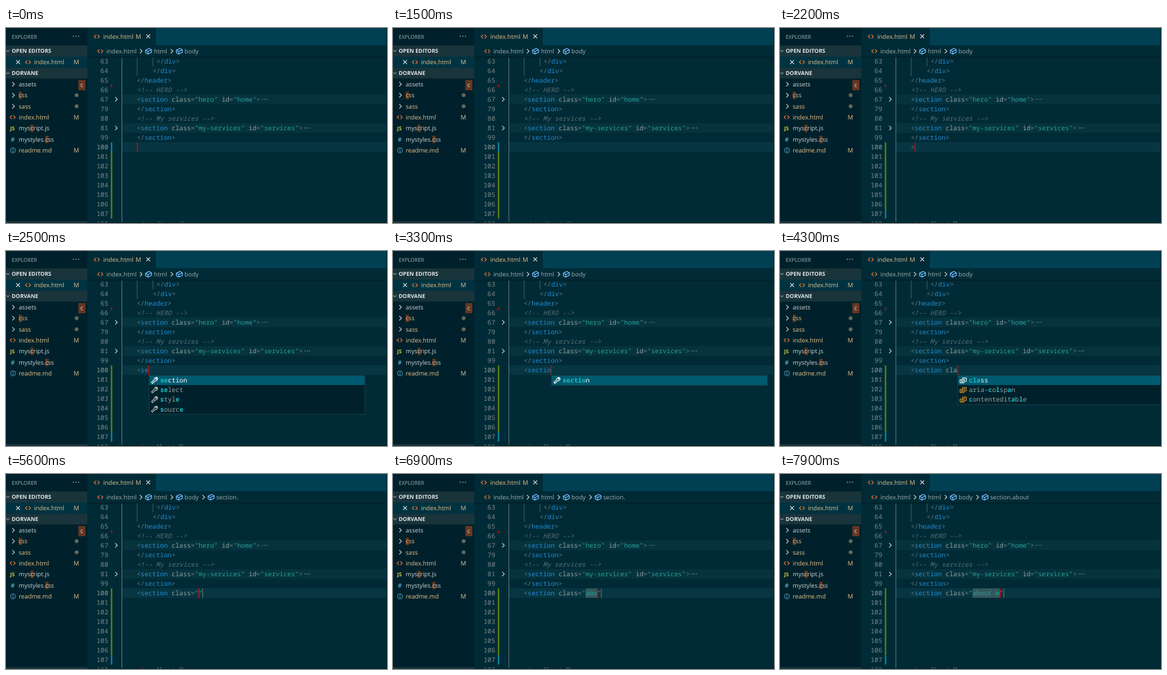
An HTML page for the animation above (8 s loop, 600 px wide and 307 px high).

```html
<!DOCTYPE html>
<html lang="en">
<head>
<meta charset="utf-8">
<style>
  html, body { margin: 0; width: 100%; height: 100%; overflow: hidden; background: #002b36; }
  svg { display: block; width: 600px; height: 307px; }
  text { font: 9.65px "Open Sans", "Noto Sans", sans-serif; white-space: pre; text-rendering: geometricPrecision; }
  .code { font: 10.13px "Noto Sans Mono", "DejaVu Sans Mono", monospace; }
  .comment { fill: #586e75; font-style: italic; }
  .tag { fill: #268bd2; }
  .attr { fill: #93a1a1; }
  .string { fill: #2aa198; }
  .punct { fill: #657b83; }
  .bad { fill: #dc322f; }
  .hit { fill: #1ebcc5; font-weight: bold; }
  .head { font-size: 8.6px; font-weight: bold; }
</style>
</head>
<body>
<svg id="stage" viewBox="0 0 600 307">
  <g id="fixed"></g>
  <g id="live"></g>
</svg>
<script>
const LOOP = 8000, CHAR = 6.08, LEFT = 206, ROW = 15.06;
const rowMid = i => 52 + i * ROW;
const MOD = '#e2c08d', PALE = '#ccd2d3', HEADER = '#1a343c', EDGE = '#001e26';

const esc = s => s.replace(/&/g, '&amp;').replace(/</g, '&lt;').replace(/>/g, '&gt;');
const span = (cls, s) => `<tspan class="${cls}">${esc(s)}</tspan>`;
const rect = (x, y, w, h, fill, extra = '') =>
  `<rect x="${x}" y="${y}" width="${w}" height="${h}" fill="${fill}" ${extra}/>`;
const line = (d, color, w = 1) => `<path d="${d}" fill="none" stroke="${color}" stroke-width="${w}"/>`;
const label = (x, y, s, color = PALE, extra = '') =>
  `<text x="${x}" y="${y + 3.4}" fill="${color}" ${extra}>${s}</text>`;
const code = (x, y, html, color = '#93a1a1', extra = '') =>
  `<text class="code" x="${x}" y="${y + 3.5}" fill="${color}" ${extra}>${html}</text>`;

// Icons, centred on x, y
const chevron = (x, y) => line(`M${x - 1.6} ${y - 3.4}l3.4 3.4l-3.4 3.4`, '#d0d4d4', 1.1);
const chevronDown = (x, y) => line(`M${x - 2.5} ${y - 1.2}l2.5 2.5l2.5 -2.5`, '#c5c5c5');
const cross = (x, y) => line(`M${x - 3} ${y - 3}l6 6m0 -6l-6 6`, '#e4e8e8', 1.1);
const angles = (x, y) =>
  line(`M${x - 1.2} ${y - 2.8}l-2.8 2.8l2.8 2.8M${x + 1.2} ${y - 2.8}l2.8 2.8l-2.8 2.8`, '#e37933', 1.2);
const cube = (x, y) =>
  line(`M${x - 4.7} ${y - 1.6}L${x + 1} ${y - 4.4}L${x + 4.7} ${y - 2.2}V${y + 1.8}L${x - 1} ${y + 4.6}L${x - 4.7} ${y + 2.4}Z` +
    `M${x - 4.7} ${y - 1.6}L${x - 1} ${y + .6}L${x + 4.7} ${y - 2.2}M${x - 1} ${y + .6}V${y + 4.6}`, '#75beff', 1.2);
const dots = (x, y, color, gap = 4) =>
  [-gap, 0, gap].map(d => `<circle cx="${x + d}" cy="${y}" r=".8" fill="${color}"/>`).join('');
const wrench = (x, y, color) =>
  line(`M${x - 4.6} ${y + 3.2}L${x - .2} ${y - 1.2}A3.1 3.1 0 0 1 ${x + 3.8} ${y - 4.6}L${x + 1.9} ${y - 2.6}` +
    `L${x + 2.6} ${y - 1.7}L${x + 4.8} ${y - 3.6}A3.1 3.1 0 0 1 ${x + 1.4} ${y + .6}L${x - 3} ${y + 4.8}Z`, color, 1.1);
const valueIcon = (x, y, color) =>
  line(`M${x - 1} ${y - 1.5}V${y - 4}H${x + 5}V${y + 1.5}H${x + 2}M${x - 5} ${y - 1}H${x + 1.5}V${y + 4}H${x - 5}Z` +
    `M${x - 3.5} ${y + .8}h3.5m-3.5 1.7h3.5M${x + 1} ${y - 2}h2.5`, color);

// Colours one line of markup
const TOKENS = /<!--.*|(?<=<\/?)\w+|"[^"]*"?|[\w-]+|[<\/>=]+| +/g;
function paint(src) {
  return src.replace(TOKENS, (tok, at) => {
    const cls = tok.startsWith('<!--') ? 'comment'
      : tok[0] === '"' ? 'string'
      : /[<\/>=]/.test(tok) ? 'punct'
      : /[<\/]/.test(src[at - 1] || '') ? 'tag' : 'attr';
    return span(cls, tok);
  });
}

function sidebar() {
  const hit = (x, y, w) => rect(x, y - 5.5, w, 11.5, '#653719');
  let s = rect(0, 0, 128, 307, '#00212b') + rect(0, 27.5, 128, 17.5, HEADER) +
    rect(0, 45, 128, 17.5, '#003341') + rect(0, 62.5, 128, 17, HEADER) + rect(0, 304, 128, 3, HEADER) +
    label(9, 13.5, 'EXPLORER', '#a5b0b3', 'style="font-size:8.3px"') + dots(110, 13, PALE) +
    chevronDown(3, 36) + label(9, 35.5, 'OPEN EDITORS', '#dfe4e4', 'class="head"') +
    cross(19, 53.7) + angles(34.5, 53.7) + label(44, 53.7, 'index.html', MOD) + label(106.5, 53.7, 'M', MOD) +
    chevronDown(3, 71) + label(9, 70.5, 'DORVANE', '#dfe4e4', 'class="head"');
  const tree = ['assets', 'css', 'sass', 'index.html', 'myscript.js', 'mystyles.css', 'readme.md'];
  const treeY = i => 88.5 + i * 17.35;
  s += hit(20, treeY(1), 5) + hit(38.5, treeY(4), 5) + hit(62, treeY(5), 5);
  tree.forEach((name, i) => {
    const y = treeY(i), changed = [1, 2, 3, 6].includes(i);
    s += label(20, y, name, changed ? MOD : PALE);
    if (i < 3) s += chevron(11.5, y);
    if (i === 1 || i === 2) s += `<circle cx="111.2" cy="${y}" r="3" fill="#62695a"/>`;
    if (i === 3 || i === 6) s += label(106.5, y, 'M', MOD);
  });
  return s + angles(10.5, treeY(3)) +
    label(6.5, treeY(4), 'JS', '#cbcb41', 'style="font-size:8.2px;font-weight:bold"') +
    label(7.5, treeY(5), '#', '#519aba', 'style="font-weight:bold"') +
    `<circle cx="11" cy="${treeY(6)}" r="4" fill="none" stroke="#519aba"/>` +
    line(`M11 ${treeY(6) - 2.5}v1.2m0 .8v3`, '#519aba', 1.2) +
    rect(114, 82, 11, 16, '#653723') + label(117, 90, 'c', '#e0dcd8');
}

function editor() {
  let s = rect(128, 0, 472, 27, '#004052') + rect(128, 0, 108, 27.5, '#002b37') +
    angles(143, 13.5) + label(153, 13.5, 'index.html', MOD) + label(204, 13.5, 'M', MOD) + cross(224, 13.2) +
    angles(148.5, 36.5) + label(158, 36.5, 'index.html', '#a0acad') +
    chevron(212.5, 36.5) + cube(224.5, 36.5) + label(233, 36.5, 'html', '#a0acad') +
    chevron(261, 36.5) + cube(273, 36.5) + label(281, 36.5, 'body', '#a0acad');
  [4, 7].forEach(i => { s += rect(183, rowMid(i) - 7.5, 417, 15, '#06333d'); });
  s += rect(183, rowMid(9) - 7.5, 417, 15, '#073642');
  s += line('M182.5 45V305', '#5f797e') + line('M206.5 45V75M231.5 45V60', '#476166', .9);
  s += rect(128, 45, 472, 1, EDGE) + rect(128, 46, 472, 1.5, EDGE, 'opacity=".4"');

  const rows = ['', '', '</header>', '<!-- HERO -->', '<section class="hero" id="home">', '</section>',
    '<!-- My services -->', '<section class="my-services" id="services">', '</section>'];
  s += code(237, rowMid(0), paint('</div>')) + code(231, rowMid(1), paint('</div>'));
  rows.forEach((src, i) => { s += code(LEFT, rowMid(i), paint(src)); });
  [4, 7].forEach(i => {
    s += chevron(173.5, rowMid(i)) + dots(LEFT + rows[i].length * CHAR + 7, rowMid(i), '#758a90', 3.5);
  });
  const numbers = [63, 64, 65, 66, 67, 79, 80, 81, 99];
  for (let n = 100; n <= 108; n++) numbers.push(n);
  numbers.forEach((n, i) => {
    s += code(161, rowMid(i), n, n === 100 ? '#8f9a9b' : '#7e888a', 'text-anchor="end"');
  });
  return s + '<path d="M165 88l3.5 3l-3.5 3z" fill="#94151b"/>';
}

// [time, typed text]; the caret blink restarts at each key
const KEYS = [
  [0, ''], [2100, '<'], [2300, '<s'], [2500, '<se'], [2800, '<sec'], [2950, '<sect'], [3100, '<secti'],
  [3300, '<sectio'], [3500, '<section'], [3700, '<section '], [3900, '<section c'], [4100, '<section cl'],
  [4300, '<section cla'], [4550, '<section clas'], [4800, '<section class']
];
const OPEN = '<section class="';
KEYS.push([5200, OPEN]);
[6500, 6650, 6800, 6950, 7080, 7200, 7500].forEach((t, i) => KEYS.push([t, OPEN + 'about-m'.slice(0, i + 1)]));

// Suggestions by typed word; capitals mark the matching letters
const MENUS = {
  s: ['Section', 'Select', 'Style', 'Source', 'Script', 'Small', 'Span'],
  se: ['SEction', 'SElect', 'StylE', 'SourcE'],
  c: ['Class', 'Contenteditable', 'Contextmenu', 'aria-Checked', 'aria-Colcount', 'aria-Colspan'],
  cl: ['CLass', 'aria-CoLspan', 'aria-CoLcount', 'aria-CoLindex', 'ContenteditabLe'],
  cla: ['CLAss', 'aria-CoLspAn', 'ContenteditAbLe'],
  clas: ['CLASs']
};
for (let n = 3; n <= 7; n++) {
  const word = 'section'.slice(0, n);
  MENUS[word] = [word.toUpperCase() + 'section'.slice(n)];
}

function menu(typed, x) {
  const items = MENUS[typed.match(/\w*$/)[0]];
  if (!items) return '';
  const icon = typed.includes(' ') ? valueIcon : wrench;
  let s = rect(x + .5, 196, 340, items.length * 15.1 + .6, '#00212b', 'stroke="#24434c" stroke-width=".8"') +
    rect(x + 1, 196.2, 339, 14.8, '#005a6f');
  items.forEach((item, i) => {
    const y = 203.7 + i * 15.1;
    const text = item.replace(/[A-Z]+/g, m => span('hit', m.toLowerCase()));
    s += icon(x + 9, y, i === 0 ? '#fff' : icon === valueIcon ? '#ee9d28' : '#c5c5c5') +
      code(x + 18, y, text, i === 0 ? '#fff' : '#93a1a1');
  });
  return s;
}

function live(t) {
  const [since, typed] = KEYS.filter(k => k[0] <= t).pop();
  const caret = LEFT + typed.length * CHAR, mid = rowMid(9), top = mid - 7.5;
  const quoted = typed.startsWith(OPEN);
  const bar = (y, end, color) => rect(165, y, 2.4, end - y, color);
  let s = typed
    ? bar(180, 285.5, '#587c0c') + bar(285.5, 300, '#0c7d9d')
    : bar(180, 195, '#0c7d9d') + bar(195, 300, '#587c0c');
  if (quoted) {
    const start = LEFT + OPEN.length * CHAR;
    s += rect(start, top, Math.max(1, caret - start), 15, '#33565b') + rect(caret + CHAR, top, .8, 15, '#7d8d8f');
  }
  s += code(LEFT, mid, paint(typed + (quoted ? '"' : '')));
  s += code(LEFT, rowMid(17), typed ? span('bad', '<!--') + span('attr', ' About Me') : paint('<!-- About Me -->'));
  if (t >= 5500) {
    s += chevron(311, 36.5) + cube(323, 36.5) + label(331, 36.5, t < 7350 ? 'section.' : 'section.about', '#a0acad');
  }
  if ((t - since) % 1000 < 500) s += rect(caret, top, 1.6, 15.5, '#d30102');
  return s + menu(typed, caret + .5) + rect(128, 306, 472, 1, EDGE) + rect(599, 0, 1, 307, EDGE);
}

const liveGroup = document.getElementById('live');
document.getElementById('fixed').innerHTML = sidebar() + editor();
let shown;
function frame() {
  const next = live(performance.now() % LOOP);
  if (next !== shown) liveGroup.innerHTML = shown = next;
  requestAnimationFrame(frame);
}
frame();
</script>
</body>
</html>
```
